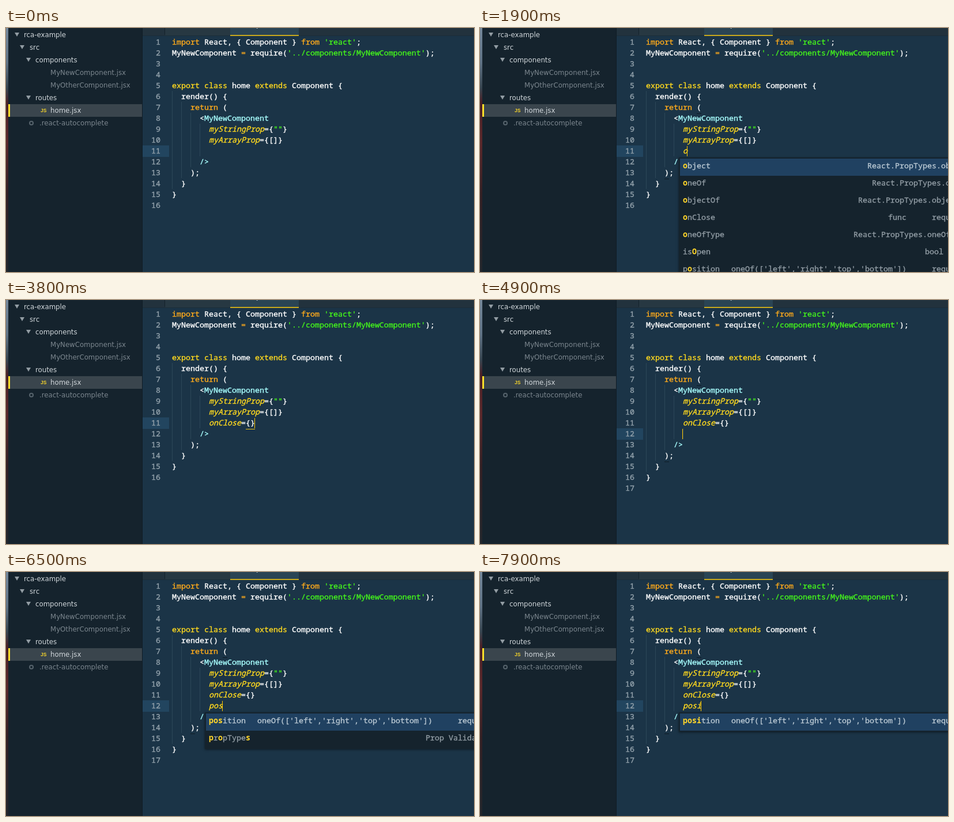
Animation, 812 px wide and 426 px high, one loop 8 s. Source, as an HTML page:

```html
<!DOCTYPE html>
<html lang="en">
<head>
<meta charset="utf-8">
<title>JSX autocomplete</title>
<style>
  html, body { margin: 0; width: 100%; height: 100%; overflow: hidden; background: #1b3447; }
  #stage { position: relative; width: 812px; height: 426px; overflow: hidden; background: #1b3447; }
  #stage div { position: absolute; white-space: pre; }
  .code, .code div { font: 500 13.3333px/19px "Noto Sans Mono", monospace; color: #fff;
    -webkit-text-stroke: .35px; }
  .code i, .hint { font-style: italic; }
  .y { color: #ffd91f; } .o { color: #ffab1c; } .g { color: #44f51c; } .c { color: #a8ffff; }
  .code .num { width: 31px; left: 237px; text-align: right; color: #93a2ac; }
  .tree { font: 11.75px/22px "DejaVu Sans", sans-serif; color: #d0d6da; }
  .dim { color: #7b868e; }
  .strip { width: 4px; height: 426px;
    background: linear-gradient(#74879a, #5f7285 60px, #36444f 105px, #4a2026 130px,
      #5a282b 200px, #332024 290px, #22262c); }
  .side { left: 4px; width: 232px; height: 426px; background: #15232d; border-right: 1px solid #101c25; }
  .code .popup { left: 345px; overflow: hidden; background: #15232d; box-shadow: 0 1px 4px #0008; }
  .code .row { left: 2px; right: 2px; height: 30px; color: #929da5; }
  .code .row div { line-height: 24px; color: inherit; }
  .code .row.on { background: #204161; color: #b9c8d3; }
  .row b { color: #ffd62a; font-weight: 700; -webkit-text-stroke: 0; }
</style>
</head>
<body>
<div id="stage">
  <div class="strip"></div>
  <div class="side"></div>
  <div id="tree"></div>
  <div id="tabs"></div>
  <div id="code" class="code"></div>
  <div id="caret"></div>
</div>
<script>
const LOOP = 8000, X0 = 288, Y0 = 15, CW = 8, LH = 19;
const $ = id => document.getElementById(id);
const box = (x, y, w, h, color) =>
  `<div style="left:${x}px;top:${y}px;width:${w}px;height:${h}px;background:${color}"></div>`;
const label = (cls, x, y, text) => `<div class="${cls}" style="left:${x}px;top:${y}px">${text}</div>`;
const esc = s => s.replace(/</g, '&lt;');

// "~y" starts yellow, "~o" orange, "~g" green, "~c" cyan, "~w" white, "~i" yellow italic
const paint = src => src.split('~').slice(1).map(part => {
  const kind = part[0], text = esc(part.slice(1));
  return kind === 'i' ? `<i class="y">${text}</i>` : `<span class="${kind}">${text}</span>`;
}).join('');

const HEAD = [
  "~oimport~w React, { Component } ~ofrom ~g'react'~w;",
  "~wMyNewComponent ~o=~w require(~g'../components/MyNewComponent'~w);",
  '', '',
  '~yexport class ~whome ~yextends ~wComponent {',
  '~w  render() {',
  '~o    return ~w(',
  '~w      <~cMyNewComponent',
  '~i        myStringProp~w={~g""~w}',
  '~i        myArrayProp~w={[]}'
];
const TAIL = ['~c      />', '~w    );', '~w  }', '~w}', ''];

// completion: name -> [type, note]
const ITEMS = {
  object: ['', 'React.PropTypes.object'],
  oneOf: ['', 'React.PropTypes.oneOf'],
  objectOf: ['', 'React.PropTypes.objectOf'],
  onClose: ['func', 'required'],
  oneOfType: ['', 'React.PropTypes.oneOfType'],
  isOpen: ['bool', ''],
  position: ["oneOf(['left','right','top','bottom'])", 'required'],
  propTypes: ['', 'Prop Validation'],
  myStringProp: ['string', ''],
  myArrayProp: ['array', '']
};

// at: start time, text: typed lines, col: caret column, list: completions
const STEPS = [
  { at: 0, text: [''], col: 8, blink: 400 },
  { at: 1800, text: ['o'], list: 'object oneOf objectOf onClose oneOfType isOpen position' },
  { at: 2300, text: ['on'], list: 'oneOf onClose oneOfType isOpen position' },
  { at: 2500, text: ['onC'], list: 'onClose' },
  { at: 3200, text: ['onClose={}'], col: 17, pair: true },
  { at: 3500, text: ['onClose={}'], pair: true },
  { at: 4900, text: ['onClose={}', ''] },
  { at: 6300, text: ['onClose={}', 'p'], list: 'position propTypes isOpen oneOfType myStringProp myArrayProp' },
  { at: 6400, text: ['onClose={}', 'po'], list: 'position propTypes' },
  { at: 6500, text: ['onClose={}', 'pos'], list: 'position propTypes' },
  { at: 6800, text: ['onClose={}', 'posi'], list: 'position' }
];

function drawTree() {
  const rows = [
    [31, 'rca-example', 15], [41, 'src', 24], [51, 'components', 35],
    [77, 'MyNewComponent.jsx'], [77, 'MyOtherComponent.jsx'],
    [51, 'routes', 35], [77, 'home.jsx'], [58, '.react-autocomplete']
  ];
  let out = box(4, 133, 232, 22, '#3a454d') + box(4, 133, 3, 22, '#ffe02a');
  rows.forEach(([x, text, arrow], i) => {
    const dim = i === 3 || i === 4 || i === 7;
    out += label('tree' + (dim ? ' dim' : ''), x, 1 + 22 * i, text);
    if (arrow) out += `<div style="left:${arrow}px;top:${8 + 22 * i}px;border:solid transparent;` +
      `border-width:7px 4px 0;border-top-color:#929ca3"></div>`;
  });
  out += `<div style="left:60px;top:138px;font:bold 8.5px/12px 'Liberation Sans',sans-serif;color:#f0d02c">JS</div>`;
  out += `<div style="left:40px;top:162px;width:4px;height:4px;border:2px solid #56636c;border-radius:50%"></div>`;
  $('tree').innerHTML = out;
}

function drawTabs() {
  $('tabs').innerHTML = box(237, 0, 575, 13, '#22323d') + box(275, 0, 1, 12, '#14212a') +
    box(276, 0, 113, 13, '#273842') + box(389, 0, 119, 13, '#2a4454') +
    box(237, 13, 575, 1, '#1a2c38') +
    box(389, 12, 119, 2, '#c9a91c') + label('tree', 398, -17, 'home.jsx') +
    label('tree dim', 249, -17, 'x');
}

// Bold the letters of the typed word, in order
function mark(name, typed) {
  let k = 0;
  return [...name].map(ch =>
    k < typed.length && ch.toLowerCase() === typed[k].toLowerCase() ? (k++, `<b>${ch}</b>`) : ch
  ).join('');
}

function popup(names, typed, y) {
  const width = names.length === 1 && names[0] === 'onClose' ? 302 : 510;
  const end = width - 9;
  const rows = names.map((name, i) => {
    const [type, note] = ITEMS[name];
    const noteX = end - note.length * CW;
    return `<div class="row${i ? '' : ' on'}" style="top:${2 + 30 * i}px">` +
      label('', 5, 0, mark(name, typed)) +
      label('hint', noteX - 44 - type.length * CW, 0, type) +
      label('hint', noteX, 0, note) + '</div>';
  }).join('');
  return `<div class="popup" style="top:${y}px;width:${width}px;height:${names.length * 30 + 4}px">${rows}</div>`;
}

function drawCode(step) {
  const extra = step.text.length, active = 9 + extra;
  const typed = step.text[extra - 1];
  const lineY = n => Y0 + LH * n;
  const mine = step.text.map(s => {
    const [name, rest] = s.split('=');
    return `~i        ${name}` + (rest ? `~w=${rest}` : '');
  });
  let out = box(237, lineY(active), 46, 20, '#22455f');

  [[0, 5, 12], [2, 6, 11], [4, 7, 10], [6, 8, 9]].forEach(([col, from, to]) => {
    out += box(X0 + col * CW, lineY(from), 1, (to + extra - from + 1) * LH, '#2c4759');
  });
  if (extra > 1 && !typed) out += box(X0 + 8 * CW, lineY(active), 1, LH, '#2c4759');

  [...HEAD, ...mine, ...TAIL].forEach((src, n) => {
    out += label('num', 237, lineY(n), n + 1) + label('', X0, lineY(n), paint(src));
  });

  if (step.pair) out += box(416, lineY(active) + 20, 16, 1, '#e6c11c');
  else if (step.at) {
    out += box(376, lineY(6) + 20, 8, 1, '#0d1a24') +
      box(320, lineY(active + 2) + 20, 8, 1, '#0d1a24');
  }
  if (step.list) out += popup(step.list.split(' '), typed, lineY(active) + 21);
  $('code').innerHTML = out;

  const col = step.col || 8 + typed.length;
  $('caret').style.cssText = `left:${X0 + col * CW - 1}px;top:${lineY(active) + 1}px;` +
    'width:1px;height:18px;background:#ffc600';
}

drawTree();
drawTabs();
let shown, start = performance.now();
function frame(now) {
  const t = Math.max(0, now - start) % LOOP;
  const step = STEPS.filter(s => s.at <= t).pop();
  if (step !== shown) drawCode(shown = step);
  const phase = (t - step.at + (step.blink || 0)) % 800;
  $('caret').style.opacity = phase < 400 ? 1 : 0;
  requestAnimationFrame(frame);
}
frame(start);
</script>
</body>
</html>
```
